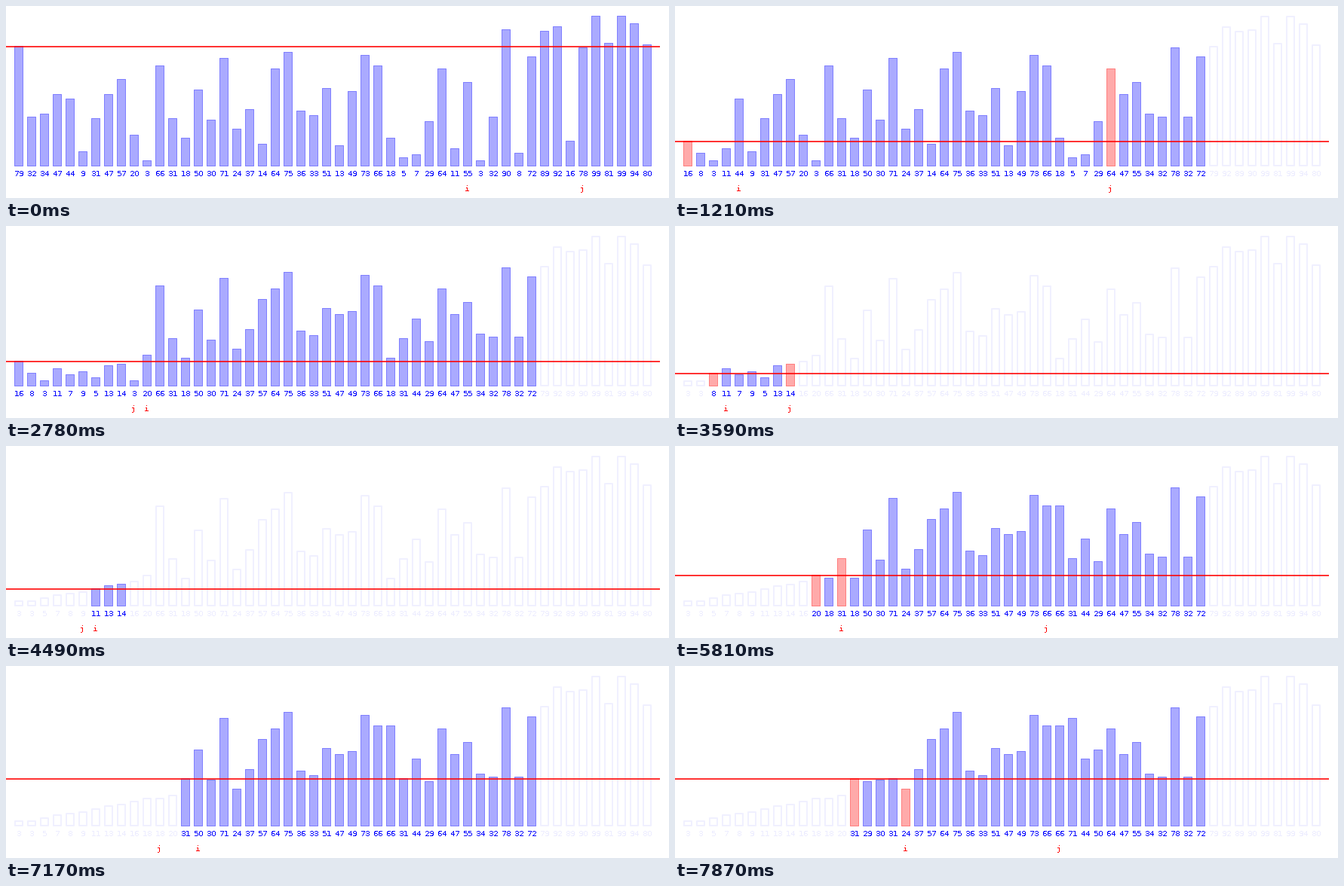
Recreate the animation shown at these times as a matplotlib script. Size 879 by 255 pixels, loop 8000 ms.

```python
import numpy as np
import matplotlib.pyplot as plt
from matplotlib.animation import FuncAnimation
from matplotlib.collections import PolyCollection

plt.rcParams.update({
    "text.antialiased": False,
    "text.hinting": "native",
    "text.hinting_factor": 1,
})

W, H, DPI = 879, 255, 64
LOOP, TICK, STEPS = 8000, 40, 60
PITCH, BASE = 17, 212
PX = 72 / DPI

# The data being sorted
VALUES = [79, 32, 34, 47, 44, 9, 31, 47, 57, 20, 3, 66, 31, 18, 50, 30, 71,
          24, 37, 14, 64, 75, 36, 33, 51, 13, 49, 73, 66, 18, 5, 7, 29, 64,
          11, 55, 3, 32, 90, 8, 72, 89, 92, 16, 78, 99, 81, 99, 94, 80]

# fill, edge
BLUE = ("#aaaaff", "#7f7fff")
PINK = ("#ffaaaa", "#ff7f7f")
PALE = ("#ffffff", "#f0f0ff")
NUMBER, PALE_NUMBER, RED = "#0000ff", "#ececff", "#ff0000"


class Sorter:
    """Quicksort that records every visible state."""

    def __init__(self, values, i, j):
        self.a = list(values)
        self.lo, self.hi = 0, len(values) - 1
        self.i, self.j = i, j
        self.log = []
        self.snap()
        self.partition()

    def snap(self, hot=None):
        self.log.append(((self.lo, self.i, self.j, hot), self.hi, self.a[:]))

    def swap(self, m, n):
        self.a[m], self.a[n] = self.a[n], self.a[m]

    def sort(self, lo, hi):
        if lo >= hi:
            return
        self.lo, self.hi = lo, hi
        self.snap()
        self.i = lo + 1
        self.snap()
        self.j = hi
        self.snap()
        self.partition()

    def partition(self):
        lo, hi = self.lo, self.hi
        pivot = self.a[lo]
        while self.i <= self.j:
            while self.i <= self.j:
                self.snap(self.i)
                if self.a[self.i] > pivot:
                    break
                self.i += 1
                self.snap()
            while self.i <= self.j:
                self.snap(self.j)
                if self.a[self.j] <= pivot:
                    break
                self.j -= 1
                self.snap()
            if self.i < self.j:
                self.swap(self.i, self.j)
                self.i += 1
                self.j -= 1
                self.snap()
        mid = self.j
        self.swap(lo, mid)
        self.snap()
        self.sort(lo, mid - 1)
        self.sort(mid + 1, hi)


log = Sorter(VALUES, 35, 44).log

# Pace of the sort: ms -> (lo, i, j, compared) reached at that time
PACE = {
    0: (0, 35, 44, None),
    1210: (0, 4, 33, 33),
    2780: (0, 10, 9, None),
    4490: (6, 6, 5, None),
    5810: (10, 12, 28, 12),
    6790: (10, 13, 12, None),
    7870: (13, 17, 29, 17),
}
order = [entry[0] for entry in log]
key_ms = np.array(list(PACE))
key_state = [order.index(key) for key in PACE.values()]

# The picture advances in near-even steps that land on the key times
key_step = np.rint(key_ms * STEPS / LOOP)
step_ms = np.interp(np.arange(STEPS), key_step, key_ms)
step_state = np.rint(np.interp(step_ms, key_ms, key_state)).astype(int)

fig = plt.figure(figsize=(W / DPI, H / DPI), dpi=DPI, facecolor="white")
ax = fig.add_axes([0, 0, 1, 1])
ax.set_xlim(0, W)
ax.set_ylim(H, 0)
ax.axis("off")


def label(x, y, s, color, font):
    return ax.text(x, y, s, color=color, fontsize=10 * PX, family=font,
                   ha="center", va="baseline")


def center(k):
    return 16 + PITCH * k


def box(k, v, grow):
    x0, x1 = 12 + PITCH * k - grow, 22 + PITCH * k + grow
    y0, y1 = BASE - 2 * v - grow, BASE + grow
    return [(x0, y0), (x1, y0), (x1, y1), (x0, y1)]


bars = PolyCollection([], zorder=1, snap=False)
ax.add_collection(bars, autolim=False)
numbers = [label(center(k) + 0.8, 226, "", NUMBER, "DejaVu Sans")
           for k in range(len(VALUES))]
pivot_line, = ax.plot([0, 867], [0, 0], color=RED, alpha=0.8, lw=2 * PX,
                      solid_capstyle="butt", zorder=4)
mark_i, mark_j = (label(0, 246, s, RED, "DejaVu Sans Mono") for s in "ij")


def draw(n):
    step = np.searchsorted(step_ms, n * TICK + 30, side="right") - 1
    (lo, i, j, hot), hi, a = log[step_state[step]]
    verts, styles, widths = [], [], []
    for k, v in enumerate(a):
        active = lo <= k <= hi
        pink = hot is not None and k in (lo, hot)
        verts.append(box(k, v, 0.5 if active else 0))
        styles.append(PINK if pink else BLUE if active else PALE)
        widths.append(PX if active else 2 * PX)
        numbers[k].set_text(str(v))
        numbers[k].set_color(NUMBER if active else PALE_NUMBER)
    bars.set_verts(verts)
    bars.set_facecolor([s[0] for s in styles])
    bars.set_edgecolor([s[1] for s in styles])
    bars.set_linewidth(widths)
    y = BASE - 2 * a[lo]
    pivot_line.set_ydata([y, y])
    mark_i.set_x(center(i))
    mark_j.set_x(center(j))
    return [bars, pivot_line, mark_i, mark_j, *numbers]


anim = FuncAnimation(fig, draw, frames=LOOP // TICK, interval=TICK,
                     repeat=True, repeat_delay=0, blit=False)
plt.show()
```
